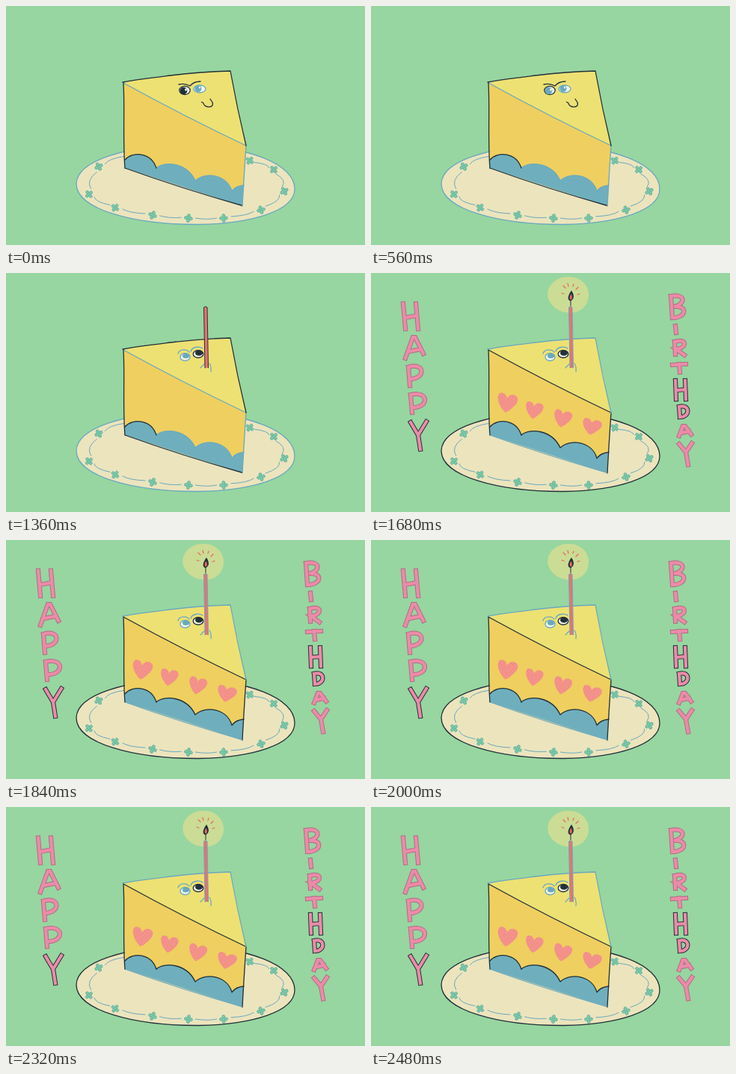
An HTML page for the animation above (2.56 s loop, 480 by 320 pixels).

```html
<!DOCTYPE html>
<html lang="en">
<head>
<meta charset="utf-8">
<title>Birthday cake</title>
<style>
html, body { margin: 0; width: 100%; height: 100%; overflow: hidden; background: #97d6a0; }
svg { display: block; width: 100vw; height: 100vh; }
svg, .face { --d: #22303a; --e: #69a9bf; --ld: #22303a; --le: #ad6f85; }
svg.swap, .face.swap { --d: #69a9bf; --e: #22303a; --ld: #ad6f85; --le: #22303a; }
path, ellipse { stroke-linecap: round; stroke-linejoin: round; }
.d, .e, .ink, .blue { fill: none; stroke-width: 1.3; }
.d { stroke: var(--d); }
.e { stroke: var(--e); }
.blue { stroke: #69a9bf; }
.ink { stroke: #22303a; }
.white { fill: #f4f5e9; }
.fd { fill: var(--d); }
.fe { fill: var(--e); }
.thin { stroke-width: 1; }
#lettering path { fill: none; stroke-linecap: square; stroke-linejoin: miter; }
#lettering .rim { stroke-width: 6.2; }
#lettering .pink { stroke: #ec8ba8; stroke-width: 4.2; }
.ld { stroke: var(--ld); }
.le { stroke: var(--le); }
</style>
</head>
<body>
<svg id="stage" viewBox="0 0 480 320">
  <defs>
    <pattern id="dots" width="3" height="3" patternUnits="userSpaceOnUse" patternTransform="rotate(28)">
      <rect width="3" height="3" fill="#f4958b"/><circle cx="1.5" cy="1.5" r=".6" fill="#e9717c"/>
    </pattern>
    <path id="heart" fill="url(#dots)" d="M0 13C-11 6-17-8-11-12C-6-14-2-10-1-6C1-12 7-14 12-10C17-4 9 6 0 13Z"/>
    <path id="flower" fill="#7ecaa3" stroke="#5fb0a4" stroke-width=".9"
      d="M-1-1C-5-7 5-7 1-1C7-5 7 5 1 1C5 7-5 7-1 1C-7 5-7-5-1-1Z"/>
  </defs>
  <rect width="480" height="320" fill="#97d6a0"/>

  <path class="e" style="fill:#ece4bd" d="M94 238C95 207 160 187 240 187C325 187 386 212 386 245C386 274 330 291 258 292.500C170 293 94 272 94 238Z"/>
  <g id="trim"></g>

  <path fill="#efcf5f" d="M157 103L321 187L316 268L159 217Z"/>
  <path fill="#6fafbd" d="M159 206C170 194 194 196 201 217C212 207 242 210 253 234C267 221 296 226 302 248Q307 241 318 240L316 268L159 217Z"/>
  <path fill="#ede173" d="M157 102.500C177 98 195 96 220 93S265 88 300 87L321 187Q239 148 157 102.500Z"/>
  <path class="e" d="M157 103Q239 148 321 187Q318 230 316 268"/>
  <path class="d" d="M159 217Q237 245 315 267"/>
  <path class="e" d="M201 217C212 207 242 210 253 234C267 221 296 226 302 248Q307 241 318 240"/>
  <path class="ink" d="M159 206C170 194 194 196 201 217M157 103C159 140 156 180 159 217"/>
  <path class="d" d="M156 102C177 98 195 96 220 93S265 88 300 87Q309 137 321 187"/>

  <g id="party">
    <use href="#heart" transform="translate(182 174) rotate(9)"/>
    <use href="#heart" transform="translate(218 184) rotate(9) scale(.88)"/>
    <use href="#heart" transform="translate(256 195) rotate(12) scale(.9)"/>
    <use href="#heart" transform="translate(295 206) rotate(12) scale(.96 .84)"/>
    <path fill="#cbdc95" d="M264 5C280 5 292 16 291 31C290 45 279 54 265 53C250 53 240 43 237 34C233 18 247 5 264 5Z"/>
    <path fill="none" stroke="#e8695f" stroke-width="1.200" d="M255 27L258 28M257 17L260 20M263 14L264 18M271 15L270 18M277 19L274 22M279 28L276 29"/>
    <g id="lettering" role="img" aria-label="Happy birthday"></g>
  </g>

  <g class="face" id="calm">
    <ellipse class="ink white" style="fill:#f4f5e9" cx="239" cy="113" rx="7.200" ry="5.600"/>
    <circle class="fd" cx="237.500" cy="113.500" r="4.800"/>
    <ellipse class="white" cx="240.500" cy="112" rx="1.400" ry="1.800"/>
    <ellipse class="blue" style="fill:#f4f5e9" cx="259" cy="111" rx="8" ry="5"/>
    <circle fill="#69a9bf" cx="257" cy="110.500" r="4.500"/>
    <ellipse class="white" cx="259" cy="109" rx="1.200" ry="1.600"/>
    <path class="ink" d="M231 105Q239 103 246 107Q251 101 260 101"/>
    <path class="ink" d="M261.500 128.500L264 130C264 136 279 138 276 129L273 124.500"/>
  </g>

  <g class="face" id="amazed">
    <ellipse class="d" style="fill:#f4f5e9" cx="239.500" cy="112.500" rx="6.500" ry="5"/>
    <ellipse class="fd" cx="240.500" cy="111" rx="4.500" ry="3.300"/>
    <ellipse class="e" style="fill:#f4f5e9" cx="257" cy="108.500" rx="6.800" ry="5"/>
    <ellipse class="fe" cx="258" cy="107" rx="5" ry="3.800"/>
    <path class="blue" d="M230 108C232 101 242 102 245 106M247 105C249 98 260 98 263 101"/>
    <path class="blue" d="M260 127L265 122M272 121Q275 126 274 132"/>
  </g>

  <g id="candle">
    <path id="wax" fill="#e8736c"/>
    <path id="waxEdge" class="d thin"/>
  </g>
  <g id="flame">
    <path fill="#22303a" d="M268 23.500C271 28 273 34 267 37.500C261 36 264 29 268 23.500Z"/>
    <path fill="#e8695f" d="M267.500 28Q270.500 34 267 36Q264 33 267.500 28Z"/>
    <path class="ink thin" d="M267 37V44"/>
  </g>
</svg>
<script>
const $ = id => document.getElementById(id);
const LOOP = 2560, STEP = 80;

const flowers = [[326, 207], [358, 219], [372, 248], [341, 273], [291, 284],
  [244, 284], [196, 280], [146, 270], [111, 252], [124, 215], [166, 198]];

// Flowers on the rim, joined by short arcs that bulge away from the centre.
$('trim').innerHTML = flowers.slice(0, -1).map(([x, y], i) => {
  const [u, v] = flowers[i + 1];
  const at = k => `${x + (u - x) * k} ${y + (v - y) * k}`;
  const mx = (x + u) / 2, my = (y + v) / 2;
  const bulge = `${mx + (mx - 240) * .09} ${my + (my - 240) * .06}`;
  return `<path class="blue thin" d="M${at(.2)}Q${bulge} ${at(.8)}"/>
    <use href="#flower" transform="translate(${x} ${y}) rotate(${35 + i * 13})"/>`;
}).join('');

// Each letter: outline class and the centre line of its strokes.
const letters = [
  ['ld', 'M43 41L46 75M60 41L63 75M45 60L61 57'],
  ['ld', 'M46 114L56 86L59 86L70 108M51 105L66 102'],
  ['ld', 'M50 126L52 151M50 126C73 119 73 142 52 142'],
  ['ld', 'M53 163L55 187M53 163C78 157 78 181 55 180'],
  ['le', 'M53 200L63 217L74 199M63 217L66 236'],
  ['ld', 'M401 31L403 60M401 31C421 27 421 42 405 45C424 43 422 60 403 60'],
  ['ld', 'M407 71L408 80'],
  ['ld', 'M406 92L407 109M406 92C424 87 422 101 408 102L419 110'],
  ['ld', 'M403 123L421 122M412 122L413 133'],
  ['le', 'M407 144L408 169M420 144L421 169M408 157L420 156'],
  ['le', 'M412 179L413 193M412 179C427 175 427 193 413 193'],
  ['ld', 'M412 218L417 205L420 205L428 216M415 214L425 212'],
  ['ld', 'M412 229L421 240L429 228M421 240L424 257']
];
$('lettering').innerHTML = letters.map(([tone, d]) =>
  `<path class="rim ${tone}" d="${d}"/><path class="pink" d="${d}"/>`).join('');

const show = (id, on) => { $(id).style.display = on ? '' : 'none'; };

function drawCandle(top) {
  const left = 264.5;
  const edge = `M266 127L${left} ${top}Q${left + 2.2} ${top - 2} ${left + 4.5} ${top}L270.500 127`;
  $('wax').setAttribute('d', edge);
  $('waxEdge').setAttribute('d', edge);
}

function draw() {
  const step = Math.floor(performance.now() % LOOP / STEP);
  const odd = step % 2 === 1;
  const party = step >= 20, candle = step >= 13;
  const flicker = odd && (step === 1 || step === 7 || step === 9 || candle);
  $('stage').classList.toggle('swap', party && odd);
  $('calm').classList.toggle('swap', flicker);
  $('amazed').classList.toggle('swap', flicker);
  show('calm', step < 14);
  show('amazed', step >= 14);
  show('party', party);
  show('candle', candle);
  show('flame', party);
  if (candle) {
    const rise = Math.min(1, (step - 12) / 4);
    drawCandle(126 - 80 * rise * (2 - rise));
  }
  requestAnimationFrame(draw);
}
draw();
</script>
</body>
</html>
```
